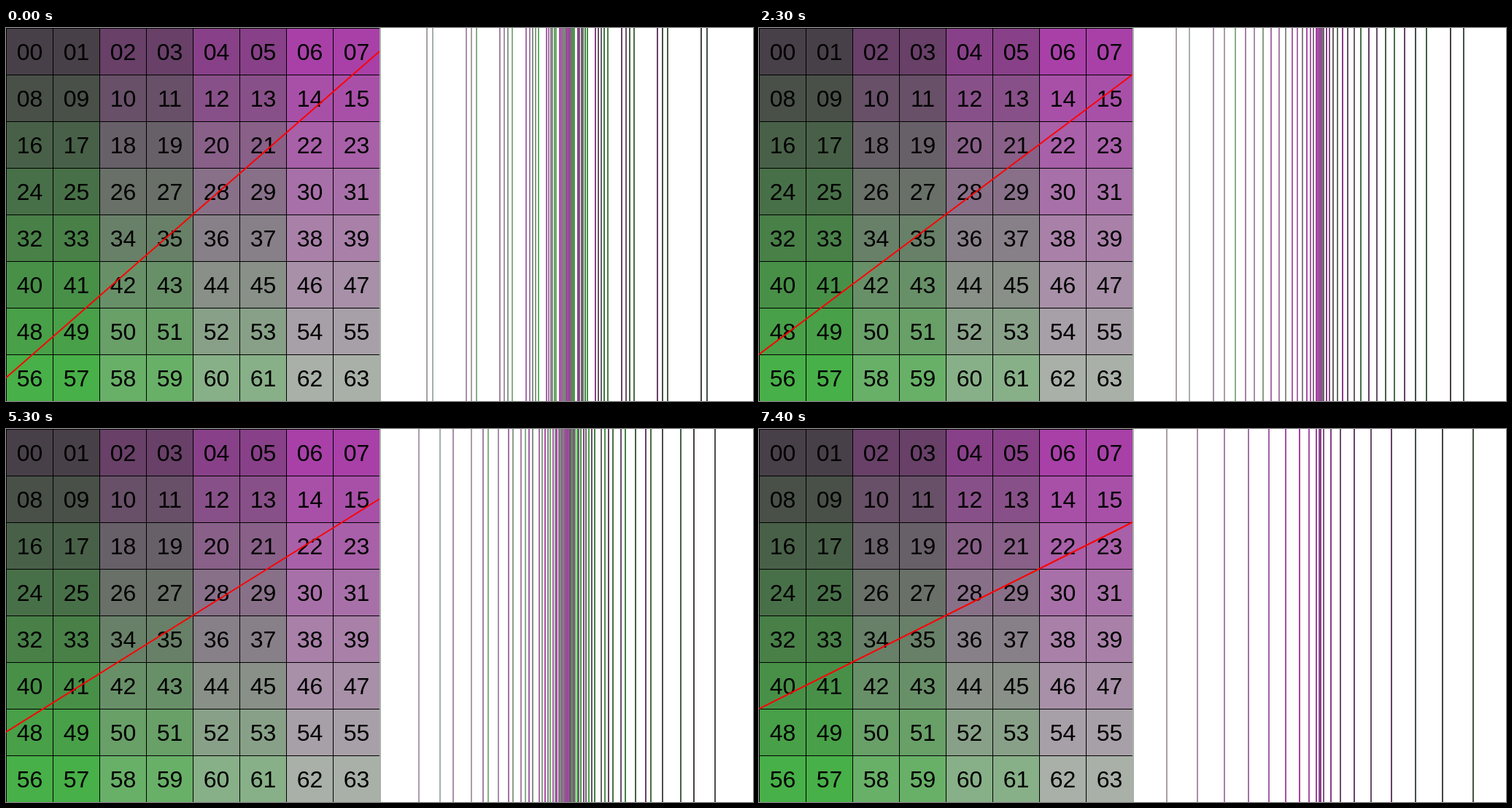
These frames come from a looping animation (1024x512 px, 8 s). An HTML page with a canvas:

```html
<!DOCTYPE html>
<html>
<head>
<meta charset="utf-8">
<style>
html, body { margin: 0; width: 100%; height: 100%; overflow: hidden; background: #fff; }
canvas { display: block; }
</style>
</head>
<body>
<canvas width="1024" height="512"></canvas>
<script>
const ctx = document.querySelector('canvas').getContext('2d');
const N = 8, SIZE = 64, MID = 256;
const start = performance.now();
let shown = -1;

function color(col, row) {
  const rb = 72 + 32 * (col >> 1);
  return `rgb(${rb},${64 + 16 * row},${rb})`;
}

function drawGrid() {
  ctx.font = '32px "Liberation Sans", Arial, sans-serif';
  ctx.textAlign = 'center';
  for (let i = 0; i < N * N; i++) {
    const col = i % N, row = i >> 3;
    const x = col * SIZE, y = row * SIZE;
    ctx.fillStyle = '#000';
    ctx.fillRect(x, y, SIZE, SIZE);
    ctx.fillStyle = color(col, row);
    ctx.fillRect(x + 1, y + 1, SIZE - 1, SIZE - 1);
    ctx.fillStyle = '#000';
    ctx.fillText(String(i).padStart(2, '0'), x + 32.5, y + 44);
  }
}

function drawAxis(rise) {
  ctx.strokeStyle = '#f00';
  ctx.lineWidth = 2;
  ctx.beginPath();
  ctx.moveTo(0, MID + rise);
  ctx.lineTo(2 * MID, MID - rise);
  ctx.stroke();
}

// One bar per cell, placed by its signed squared distance along the slope.
function drawBars(slope) {
  ctx.fillStyle = '#fff';
  ctx.fillRect(512, 0, 512, 512);
  const max = 3.5 * (1 + slope);
  for (let i = N * N - 1; i >= 0; i--) {
    const col = i % N, row = i >> 3;
    const d = (col - 3.5 + slope * (row - 3.5)) / max;
    ctx.fillStyle = color(col, row);
    ctx.fillRect(Math.round(768 - MID * d * Math.abs(d)), 0, 2, 512);
  }
}

function tick(now) {
  const t = Math.max(0, now - start) % 8000;
  const step = Math.floor((t + 2500) / 3000);
  if (step !== shown) {
    shown = step;
    const slope = (7 - step) / 8;
    drawGrid();
    drawAxis(MID * slope);
    drawBars(slope);
  }
  requestAnimationFrame(tick);
}
tick(start);
</script>
</body>
</html>
```
